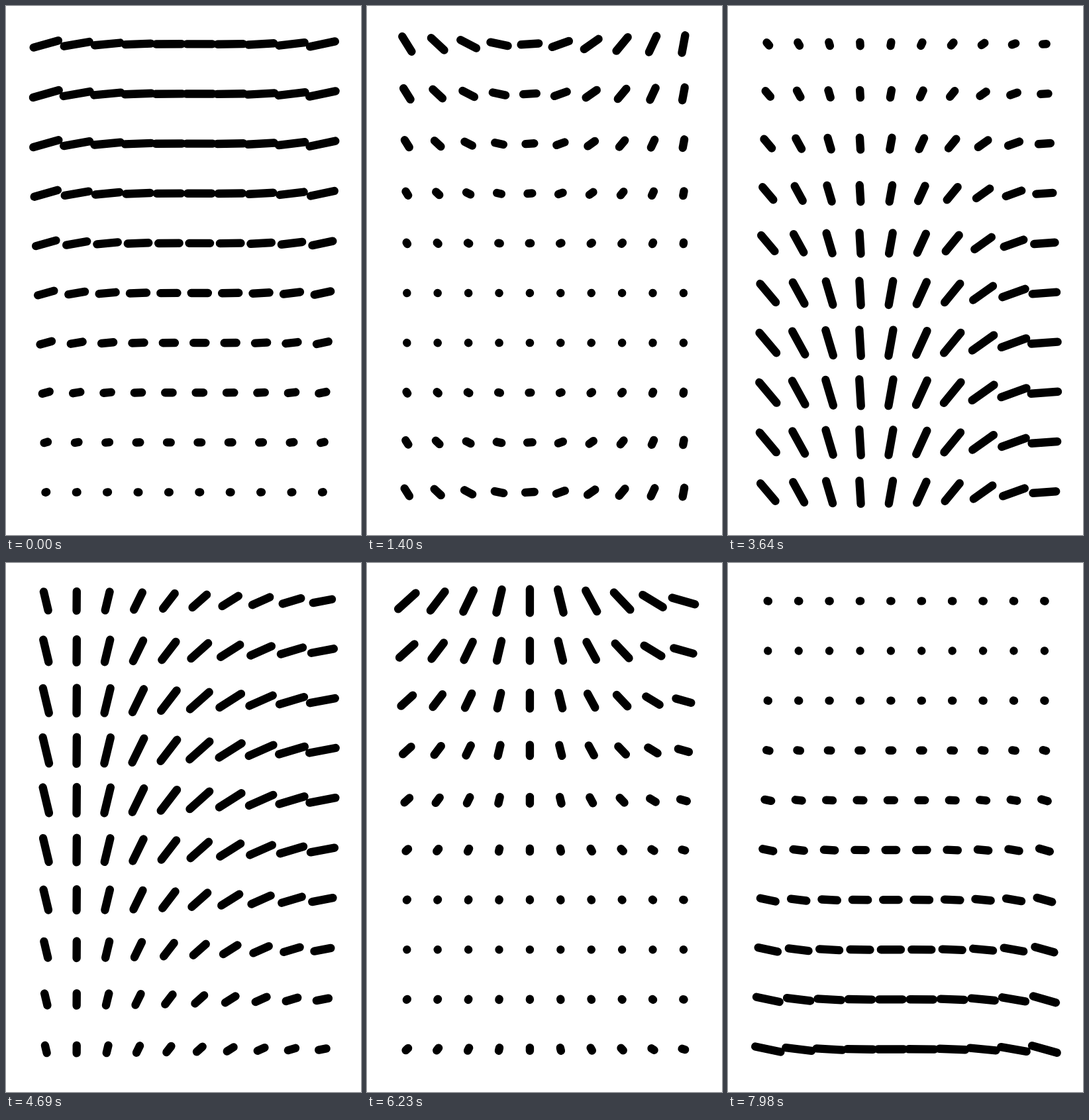
These frames come from a looping animation (536 by 798 pixels, 8000 ms). An HTML page with a canvas:

```html
<!DOCTYPE html>
<html lang="en">
<head>
<meta charset="utf-8">
<title>Swinging dashes</title>
<style>
  html, body { margin: 0; width: 100%; height: 100%; overflow: hidden; background: #fff; }
  canvas { display: block; }
</style>
</head>
<body>
<canvas width="536" height="798"></canvas>
<script>
const ctx = document.querySelector('canvas').getContext('2d');
const LOOP = 8000, STEP = 70;
const COUNT = 10;
const LEFT = 60.3, TOP = 57.4, GAP_X = 46.4, GAP_Y = 75.12;
const MAX_LENGTH = 40.4, THICKNESS = 12.4;
const START = -24.1, SPEED = 4.765;   // degrees, degrees per step
const COLUMN_LAG = 5, ROW_LAG = 20;   // degrees

const cosDeg = degrees => Math.cos(degrees * Math.PI / 180);

function dash(x, y, length, angle) {
  const dx = Math.cos(angle) * length / 2;
  const dy = Math.sin(angle) * length / 2;
  ctx.moveTo(x - dx, y - dy);
  ctx.lineTo(x + dx, y + dy);
}

function draw(time) {
  const phase = START + SPEED * Math.floor(time % LOOP / STEP);
  ctx.fillStyle = '#fff';
  ctx.fillRect(0, 0, 536, 798);
  ctx.strokeStyle = '#000';
  ctx.lineWidth = THICKNESS;
  ctx.lineCap = 'round';
  ctx.beginPath();
  // Rows share a length, columns share an angle.
  for (let row = 0; row < COUNT; row++) {
    const wave = (1 + cosDeg(phase + ROW_LAG * row)) / 2;
    const length = Math.max(0.05, MAX_LENGTH * wave);
    for (let col = 0; col < COUNT; col++) {
      const angle = Math.PI * cosDeg(phase + COLUMN_LAG * col);
      dash(LEFT + GAP_X * col, TOP + GAP_Y * row, length, angle);
    }
  }
  ctx.stroke();
}

const startTime = performance.now();
function tick() {
  draw(performance.now() - startTime);
  requestAnimationFrame(tick);
}
tick();
</script>
</body>
</html>
```
